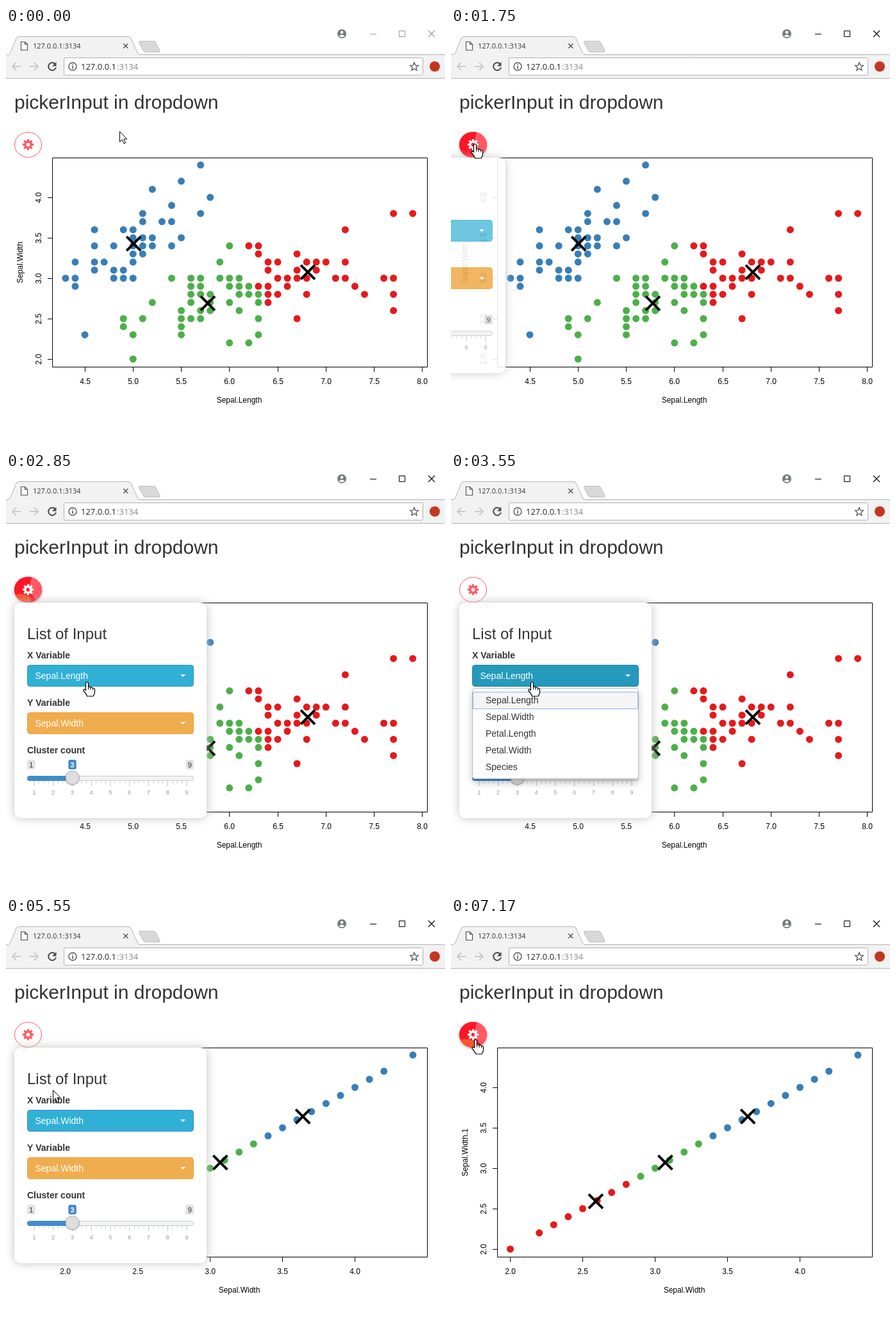
Animation of 685x650 px, one loop 7630 ms. Source, as an HTML page with a canvas:

```html
<!DOCTYPE html>
<html lang="en">
<head>
<meta charset="utf-8">
<title>Dropdown demo</title>
<style>
html, body { margin: 0; width: 100%; height: 100%; overflow: hidden; background: #fff; }
canvas { display: block; }
</style>
</head>
<body>
<canvas id="stage" width="685" height="650"></canvas>
<script>
const LOOP = 7630;
const ARIAL = '"Liberation Sans", Arial, sans-serif';
const UI = '"Open Sans", sans-serif';
const RED = '#e41a1c', BLUE = '#377eb8', GREEN = '#4daf4a';

const stage = document.getElementById('stage').getContext('2d');
const layerCanvas = document.createElement('canvas');
layerCanvas.width = 685;
layerCanvas.height = 650;
const layer = layerCanvas.getContext('2d');
let g = stage;

// Sepal width -> sepal lengths, all in tenths; "a-b" is a run.
const rows = {
  20: '50', 22: '60 62', 23: '45 50 55 63', 24: '49 55', 25: '49 51 55-57 63 67',
  26: '55 57-58 61 77', 27: '52 56 58 60 63-64', 28: '56-58 61-65 68 74 77',
  29: '44 56-57 60-64 66 73', 30: '43-44 48-50 54 56-57 59-61 65-68 71-72 76-77',
  31: '46 48-49 64 67 69', 32: '44 46-47 50 59 64-65 68-70 72', 33: '50-51 63 67',
  34: '46 48 50-52 54 60 62-63', 35: '50-52 55', 36: '46 49-50 72', 37: '51 53-54',
  38: '51 57 77 79', 39: '54', 40: '58', 41: '52', 42: '55', 44: '57'
};
const flowers = [];
for (const width in rows) {
  for (const run of rows[width].split(' ')) {
    const [from, to = from] = run.split('-').map(Number);
    for (let n = from; n <= to; n++) flowers.push([n / 10, width / 10]);
  }
}

const plots = {
  length: {
    points: flowers, xLabel: 'Sepal.Length', yLabel: 'Sepal.Width',
    x: v => 123 + (v - 4.5) * 150.5, ticks: [4.5, 8],
    centers: [[5.006, 3.428, BLUE], [5.775, 2.69, GREEN], [6.812, 3.074, RED]]
  },
  width: {
    points: Object.keys(rows).map(w => [w / 10, w / 10]),
    xLabel: 'Sepal.Width', yLabel: 'Sepal.Width.1',
    x: v => 92.5 + (v - 2) * 226, ticks: [2, 4],
    centers: [[2.59, 2.59, RED], [3.07, 3.07, GREEN], [3.64, 3.64, BLUE]]
  }
};

const clamp = v => Math.max(0, Math.min(1, v));

// cubic-bezier(.25, .1, .25, 1)
function ease(x) {
  x = clamp(x);
  let lo = 0, hi = 1;
  for (let i = 0; i < 24; i++) {
    const s = (lo + hi) / 2;
    if (.75 * s * (1 - s) + s * s * s < x) lo = s; else hi = s;
  }
  return .3 * lo * (1 - lo) ** 2 + 3 * lo * lo * (1 - lo) + lo ** 3;
}

function text(s, x, y, font, color, align = 'left', angle = 0) {
  g.save();
  g.translate(x, y);
  g.rotate(angle);
  g.font = font;
  g.fillStyle = color;
  g.textAlign = align;
  g.fillText(s, 0, 0);
  g.restore();
}

function shape(path, fill, stroke, width = 1) {
  const p = typeof path === 'string' ? new Path2D(path) : path;
  if (fill) { g.fillStyle = fill; g.fill(p, 'evenodd'); }
  if (stroke) { g.strokeStyle = stroke; g.lineWidth = width; g.stroke(p); }
}

function oval(x, y, rx, ry, fill, stroke, width) {
  const p = new Path2D();
  p.ellipse(x, y, rx, ry, 0, 0, 7);
  shape(p, fill, stroke, width);
}

function box(x, y, w, h, r, fill, stroke) {
  const p = new Path2D();
  p.roundRect(x, y, w, h, r);
  shape(p, fill, stroke);
}

function shadowed(color, blur, dy, draw) {
  g.save();
  g.shadowColor = color;
  g.shadowBlur = blur;
  g.shadowOffsetY = dy;
  draw();
  g.restore();
}

function drawBrowser(focused) {
  const control = focused ? '#000' : '#999';
  oval(524, 9, 7, 7, '#757d78');
  oval(524, 6.8, 2.3, 2.3, '#fff');
  shape('M519.5 12.5Q524 8.5 528.5 12.5Q524 16 519.5 12.5Z', '#fff');
  shape('M568 9.5H578M613.5 4.5H622.5V13.5H613.5Z', null, control);
  shape('M659 4L669 14M669 4L659 14', null, control, 1.1);

  g.fillStyle = '#f2f2f2';
  g.fillRect(0, 41, 685, 37);
  shape('M0 41.5H4Q6 41 7 38L16 16Q17 13.5 20 13.5H191Q194 13.5 195 16L205 38Q206 41.5 209 41.5H685V42H0Z', '#f2f2f2');
  shape('M0 41.5H3Q6 41 7 38L16 16Q17 13.5 20 13.5H191Q194 13.5 195 16L205 38Q206 41.5 209 41.5H685M0 78.5H685', null, '#b3b3b3');
  shape('M209 20.5H230Q233 20.5 234 23L240 35Q241 37.5 238 37.5H218Q215 37.5 214 35L207.5 23Q207 20.5 209 20.5Z', '#d8d8d8', '#c0c0c0');
  shape('M23.5 21.5H29.5L33.5 25.5V34.5H23.5ZM29.5 21.5V25.5H33.5', '#fff', '#555', 1.2);
  text('127.0.0.1:3134', 42, 32, '11px ' + UI, '#333');
  shape('M183.3 24.5L190.3 31.5M190.3 24.5L183.3 31.5', null, '#555', 1.5);

  shape('M23 60H10M16 54L10 60L16 66M37 60H50M44 54L50 60L44 66', null, '#ccc', 2);
  shape('M76.7 56A6 6 0 1 0 78 61.5', null, '#4a4a4a', 2);
  shape('M78.5 53V59.5H72Z', '#4a4a4a');
  box(90.5, 46.5, 560, 27, 2, '#fff', '#b0b0b0');
  oval(104, 60, 6, 6, null, '#555', 1.4);
  shape('M104 56.2V57.8M104 59V63.8', null, '#555', 1.6);
  text('127.0.0.1', 117, 65, '13px ' + UI, '#222');
  text(':3134', 173, 65, '13px ' + UI, '#888');
  let star = '';
  for (let i = 0; i < 10; i++) {
    const a = i * Math.PI / 5, r = i % 2 ? 3 : 6.8;
    star += (i ? 'L' : 'M') + (637 + r * Math.sin(a)) + ' ' + (60.5 - r * Math.cos(a));
  }
  shape(star + 'Z', null, '#555', 1.3);
  oval(669, 60, 8, 8, '#c5351f');
}

function drawPlot({ points, centers, x, ticks, xLabel, yLabel }) {
  const font = '12px ' + ARIAL;
  const y = v => 516 - (v - 2) * 126;
  for (const [px, py] of points) {
    const distance = c => (c[0] - px) ** 2 + (c[1] - py) ** 2;
    const nearest = centers.reduce((a, b) => distance(b) < distance(a) ? b : a);
    oval(x(px), y(py), 5.5, 5.5, nearest[2]);
  }
  for (const [cx, cy] of centers) {
    const a = x(cx), b = y(cy), r = 11;
    shape(`M${a - r} ${b - r}L${a + r} ${b + r}M${a - r} ${b + r}L${a + r} ${b - r}`, null, '#000', 4);
  }
  shape('M72.5 202.5H657.5V528.5H72.5Z', null, '#000');
  for (let v = ticks[0]; v <= ticks[1]; v += .5) {
    const tx = Math.floor(x(v)) + .5;
    shape(`M${tx} 528V536`, null, '#000');
    text(v.toFixed(1), tx, 555, font, '#000', 'center');
  }
  for (let v = 2; v <= 4; v += .5) {
    const ty = Math.floor(y(v)) + .5;
    shape(`M65 ${ty}H72`, null, '#000');
    text(v.toFixed(1), 55, ty, font, '#000', 'center', -Math.PI / 2);
  }
  text(xLabel, 364, 584, font, '#000', 'center');
  text(yLabel, 26, 365.5, font, '#000', 'center', -Math.PI / 2);
}

function drawCog(color) {
  const p = new Path2D();
  for (let k = 0; k < 8; k++) {
    for (const [offset, r] of [[-14, 6.4], [-10, 8.8], [10, 8.8], [14, 6.4]]) {
      const a = (k * 45 + offset) * Math.PI / 180;
      p.lineTo(34.5 + r * Math.cos(a), 181.8 + r * Math.sin(a));
    }
  }
  p.closePath();
  p.moveTo(37.4, 181.8);
  p.arc(34.5, 181.8, 2.9, 0, 7);
  shape(p, color);
}

function drawGear(hover, orange) {
  oval(34.5, 182, 21, 19.5, '#fff', '#ff5964');
  drawCog('#ff5964');
  if (!hover) return;
  g.save();
  g.globalAlpha = hover;
  shadowed('rgba(0,0,0,.35)', 5, 1, () => oval(34.5, 182, 21.5, 20, '#ff5964'));
  const clip = new Path2D();
  clip.ellipse(34.5, 182, 21.5, 20, 0, 0, 7);
  g.clip(clip);
  shape('M11 160H41L35 182L52 205H11Z', '#ff1526');
  if (orange) shape('M11 192Q24 184 38 194V205H11Z', '#f9552c');
  drawCog('#fff');
  g.restore();
}

function drawPicker(y, label, fill, border) {
  box(33.5, y + .5, 259, 33, 4, fill, border);
  text(label, 45.5, y + 22, '14px ' + ARIAL, '#fff');
  shape(`M272 ${y + 15}H280L276 ${y + 19}Z`, '#fff');
}

function drawSlider() {
  const badge = (s, x, fill, color, weight = '') => {
    box(x, 447, 12.5, 15, 3, fill);
    text(s, x + 6.2, 458.5, weight + '11px ' + ARIAL, color, 'center');
  };
  badge('1', 33, '#e1e1e1', '#333');
  badge('9', 280.5, '#e1e1e1', '#333');
  badge('3', 97.3, '#428bca', '#fff', 'bold ');
  for (let i = 0; i <= 32; i++) {
    const x = 44 + i * 29.75 / 4, major = i % 4 === 0;
    shape(`M${x} 480V${major ? 488 : 484}`, null, major ? '#a9cbe2' : '#c4d3d8');
    if (major) text(i / 4 + 1, x, 501, '9.5px ' + ARIAL, '#999', 'center');
  }
  box(33.5, 472.5, 259, 7, 4, '#f2f2f2', '#ccc');
  box(33, 472, 72, 8, [4, 0, 0, 4], '#428bca');
  shadowed('rgba(0,0,0,.3)', 3, 1, () => oval(103.5, 475, 10.5, 10.5, '#dedede'));
  oval(103.5, 475, 10.5, 10.5, null, '#aaa');
}

function drawMenu(cursorY) {
  shadowed('rgba(0,0,0,.25)', 12, 6, () => box(33.5, 335.5, 259, 141, 4, '#fff'));
  box(33.5, 335.5, 259, 141, 4, '#fff', '#bbb');
  ['Sepal.Length', 'Sepal.Width', 'Petal.Length', 'Petal.Width', 'Species'].forEach((name, i) => {
    const y = 341 + i * 26, over = cursorY >= y && cursorY < y + 26;
    if (!i || over) box(34, y, 258, 26, 0, '#f5f5f5');
    if (!i) box(34.5, y + .5, 257, 26, 0, null, '#8fb2f5');
    text(name, 54, y + 18, '14px ' + ARIAL, '#333');
  });
}

function drawPanel(t, cursor) {
  const over = y => cursor.x > 33 && cursor.x < 293 && cursor.y >= y && cursor.y < y + 34;
  const menuOpen = t >= 3160 && t < 4160;
  const focused = t >= 4160 && t < 5940;
  shadowed('#c0c0c0', 15, 0, () => box(13, 202, 300, 336, 10, '#fff'));
  text('List of Input', 33, 259, '24px ' + ARIAL, '#333');
  text('X Variable', 33, 289, 'bold 14px ' + ARIAL, '#333');
  text('Y Variable', 33, 363, 'bold 14px ' + ARIAL, '#333');
  text('Cluster count', 33, 437, 'bold 14px ' + ARIAL, '#333');

  const info = menuOpen ? ['#269abc', '#1b7f9e']
    : focused ? ['#31b0d5', '#4388d8']
    : over(299) ? ['#31b0d5', '#269abc'] : ['#5bc0de', '#46b8da'];
  const warning = over(373) && !menuOpen ? ['#ec971f', '#d58512'] : ['#f0ad4e', '#eea236'];
  drawPicker(299, t < 4160 ? 'Sepal.Length' : 'Sepal.Width', ...info);
  drawPicker(373, 'Sepal.Width', ...warning);
  drawSlider();
  if (menuOpen) drawMenu(cursor.y);
}

// Slides in from 2000px on the left, leaves 2000px to the right.
function drawSlidingPanel(t, cursor) {
  const enter = ease((t - 1150) / 1000), leave = ease((t - 6115) / 1000);
  const dx = -2000 * (1 - enter) + 2000 * leave;
  if (Math.abs(dx) > 700) return;
  g = layer;
  g.clearRect(0, 0, 685, 650);
  drawPanel(t, cursor);
  g = stage;
  g.globalAlpha = enter * (1 - leave);
  g.drawImage(layerCanvas, dx, 0);
  g.globalAlpha = 1;
}

// [start, end, x, y]: each move ends at x, y.
const moves = [
  [0, 0, 177, 161], [380, 1050, 37, 180], [2390, 2850, 126, 325],
  [3550, 3860, 121, 375], [5160, 5870, 38, 189]
];

function cursorAt(t) {
  let [, , x, y] = moves[0];
  for (const [start, end, toX, toY] of moves.slice(1)) {
    const p = clamp((t - start) / (end - start)), s = p * p * (3 - 2 * p);
    x += (toX - x) * s;
    y += (toY - y) * s;
  }
  const onGear = Math.hypot((x - 34.5) / 21.5, (y - 182) / 20) < 1;
  const onPicker = x > 33 && x < 293 && (y >= 299 && y < 333 || y >= 373 && y < 407);
  const onMenu = t >= 3160 && t < 4160;
  return { x: Math.round(x), y: Math.round(y), onGear, hand: onGear || onPicker || onMenu };
}

function drawCursor({ x, y, hand }) {
  g.save();
  g.translate(x + .5, y + .5);
  g.lineJoin = 'round';
  if (hand) {
    shape('M-2 13V2Q0 -1.5 2 2V8Q4 6.5 5.5 9Q8 7.5 9 10Q12 9.5 12 12V16Q12 19 9.5 22.5H0Q-1 19 -5.5 14Q-6.5 10 -2 13Z', '#fff', '#000', 1.2);
    shape('M2 8V12M5.5 9V12.5M9 10V13', null, '#000');
  } else {
    shape('M0 0V16L3.7 12.6L6.5 18.7L9 17.6L6.3 11.6H11.3Z', '#fff', '#000');
  }
  g.restore();
}

function draw(t) {
  const cursor = cursorAt(t);
  const gearHover = t < 2390 || t > 5000 ? +cursor.onGear : clamp((3310 - t) / 230);
  g.fillStyle = '#fff';
  g.fillRect(0, 0, 685, 650);
  drawBrowser(t >= 1130);
  text('pickerInput in dropdown', 13, 126, '30px ' + ARIAL, '#333');
  drawPlot(t < 4320 ? plots.length : plots.width);
  drawGear(gearHover, t > 1900);
  drawSlidingPanel(t, cursor);
  drawCursor(cursor);
}

const begin = performance.now();
function frame() {
  draw((performance.now() - begin) % LOOP);
  requestAnimationFrame(frame);
}
frame();
</script>
</body>
</html>
```
